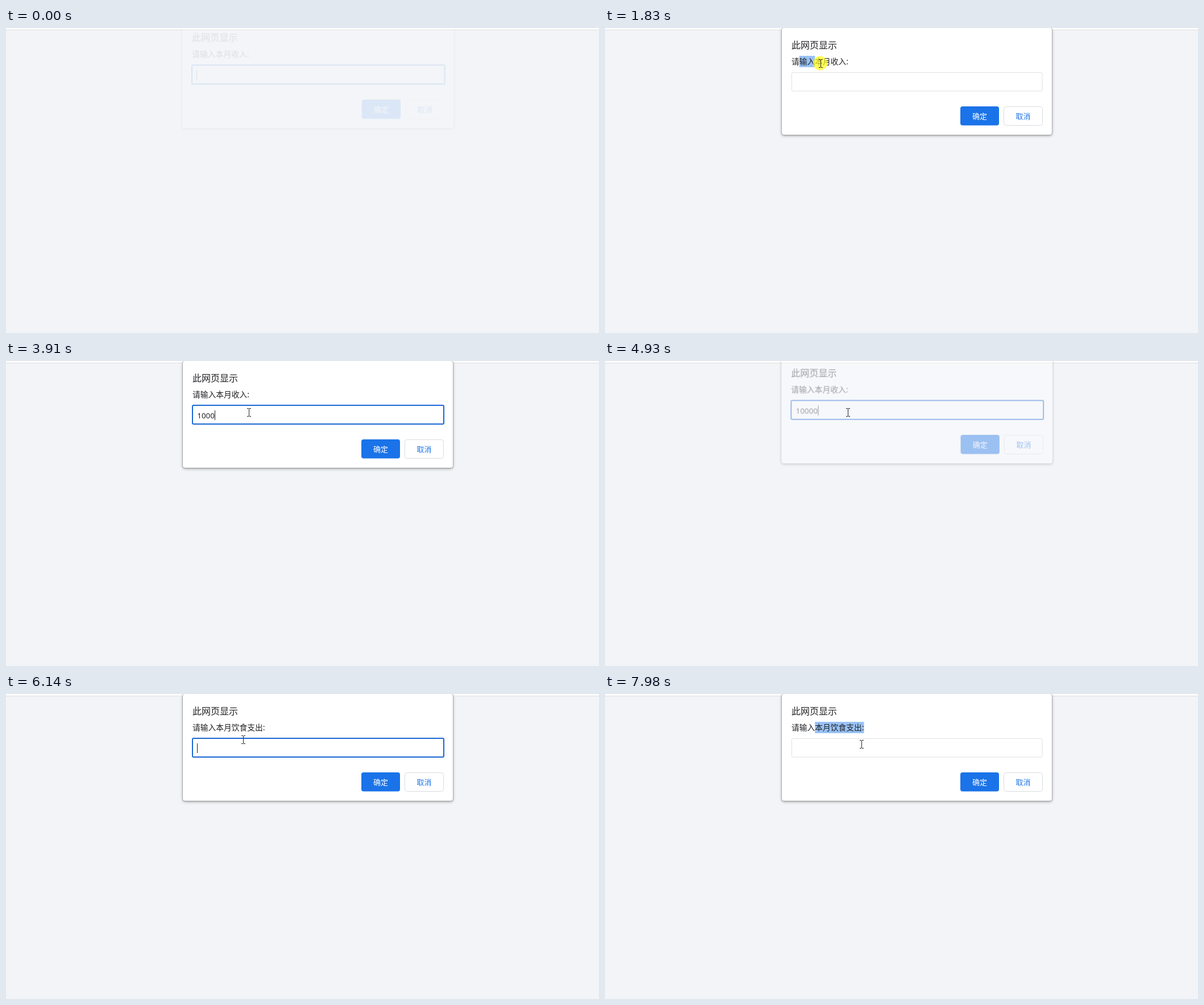
Animation of 1043 by 537 pixels, one loop 8000 ms. Source, as an HTML page with a canvas:

```html
<!DOCTYPE html>
<html lang="zh-CN">
<head>
<meta charset="utf-8">
<title>Prompt dialog</title>
<style>
html, body { margin: 0; width: 100%; height: 100%; overflow: hidden; background: #f2f4f8; }
canvas { display: block; }
</style>
</head>
<body>
<canvas id="stage" width="1043" height="537"></canvas>
<script>
const W = 1043, H = 537, LOOP = 8000;
const stage = document.getElementById('stage').getContext('2d');
const sheet = document.createElement('canvas');
sheet.width = W;
sheet.height = H;
const ctx = sheet.getContext('2d');

const CJK = '"Noto Sans CJK SC", "Noto Sans CJK", "Noto Sans", sans-serif';
const LABEL_FONT = '13.75px ' + CJK;
const DIGIT_FONT = '13.4px "Noto Sans", sans-serif';
const INK = '#202124', BLUE = '#1a73e8';
const LEFT = 328;

// Pointer path: time, x, y
const PATH = [
  [400, 42, 200], [470, 290, 142], [540, 387, 118], [610, 392, 112], [740, 385, 88],
  [880, 370, 62], [1010, 352, 53], [1150, 344, 56], [1360, 344, 56], [1830, 379, 62],
  [2020, 416, 62], [2090, 421, 64], [2290, 421, 64], [2360, 427, 60], [2500, 427, 60],
  [2570, 430, 65], [2710, 429, 82], [2850, 427, 90], [5860, 427, 90], [6130, 417, 80],
  [6400, 380, 62], [6620, 367, 57], [6890, 367, 57], [6960, 374, 57], [7160, 430, 55],
  [7300, 470, 49], [7370, 466, 43], [7630, 466, 43], [7700, 463, 52], [7980, 451, 88]
];
const PRESSES = [[1220, 2360], [2920, 2980], [6690, 7370]];
const SELECTIONS = [[1220, 2920], [6760, LOOP]];
const BLURRED = [[1220, 2920], [6760, LOOP]];
const CARET = [[0, 400], [970, 1220], [2920, 3450], [3570, 4790], [4930, 5460], [5960, 6460]];
const KEYSTROKES = [3570, 3680, 3800, 3910, 4310];
const NEXT_PROMPT = 4995;

const active = (spans, t) => spans.find(([from, to]) => t >= from && t < to);

function pointerAt(t) {
  const i = PATH.findIndex(p => p[0] > t);
  if (i < 0) return PATH[PATH.length - 1].slice(1);
  const [t0, x0, y0] = PATH[Math.max(0, i - 1)];
  const [t1, x1, y1] = PATH[i];
  const steps = Math.max(1, Math.round((t1 - t0) / 70));
  const f = Math.max(0, Math.floor((t - t0) / (t1 - t0) * steps) / steps);
  return [x0 + (x1 - x0) * f, y0 + (y1 - y0) * f];
}

function opacityAt(t) {
  if (t < 70) return 0.1;
  if (t < 140) return 0.6;
  if (t >= 4930 && t < NEXT_PROMPT) return 0.4;
  if (t >= NEXT_PROMPT && t < 5060) return 0.3;
  return 1;
}

function box(c, x, y, w, h, r, fill, stroke, width = 1) {
  c.beginPath();
  c.roundRect(x, y, w, h, r);
  if (fill) { c.fillStyle = fill; c.fill(); }
  if (stroke) { c.strokeStyle = stroke; c.lineWidth = width; c.stroke(); }
}

function text(str, x, y, font, color = INK, align = 'left') {
  ctx.font = font;
  ctx.fillStyle = color;
  ctx.textAlign = align;
  ctx.fillText(str, x, y);
}

function widthOf(str, font) {
  ctx.font = font;
  return ctx.measureText(str).width;
}

function drawSelection(t, label) {
  const span = active(SELECTIONS, t);
  if (!span) return;
  const edge = time => {
    const n = Math.round((pointerAt(time)[0] - LEFT) / 13.75);
    return LEFT + widthOf(label.slice(0, Math.max(0, n)), LABEL_FONT);
  };
  const press = active(PRESSES, t);
  const release = PRESSES.find(p => p[1] > span[0])[1];
  const from = edge(span[0]);
  const to = edge(press ? Math.max(span[0], t - 40) : release - 40);
  ctx.fillStyle = '#99c2f5';
  ctx.fillRect(from, 49, to - from, 20);
}

function drawDialog(t, label) {
  ctx.clearRect(0, 0, W, H);
  ctx.save();
  ctx.shadowColor = 'rgba(0,0,0,.38)';
  ctx.shadowBlur = 5;
  ctx.shadowOffsetY = 1.5;
  box(ctx, 311, 0, 475, 188, 4, '#fff');
  ctx.restore();
  box(ctx, 310.5, -0.5, 476, 189, 4, null, 'rgba(0,0,0,.16)');

  text('此网页显示', LEFT, 36, '16px ' + CJK);
  drawSelection(t, label);
  text(label, LEFT, 64.2, LABEL_FONT);

  if (active(BLURRED, t)) box(ctx, 328.5, 78.5, 440.5, 32.5, 2, '#fff', '#dfe0e2');
  else box(ctx, 328, 78, 442, 33, 2, '#fff', '#1967d2', 2);

  const typed = t < NEXT_PROMPT ? '10000'.slice(0, KEYSTROKES.filter(k => t >= k).length) : '';
  text(typed, 336.3, 100.5, DIGIT_FONT);
  if (active(CARET, t)) {
    ctx.fillStyle = INK;
    ctx.fillRect(Math.round(336.3 + widthOf(typed, DIGIT_FONT)), 87, 1, 17);
  }

  box(ctx, 625, 138, 68, 33.5, 4, BLUE);
  text('确定', 659, 160, '13px ' + CJK, '#fff', 'center');
  box(ctx, 701.5, 138.5, 68, 33, 4, '#fff', '#dadce0');
  text('取消', 735.5, 160, '13px ' + CJK, BLUE, 'center');
}

function drawArrow(x, y) {
  const shape = [[0, 0], [0, 14.5], [3.3, 11.4], [5.6, 16.4], [7.8, 15.4], [5.6, 10.6], [10, 10.2]];
  stage.beginPath();
  shape.forEach(([dx, dy]) => stage.lineTo(x + 0.5 + dx, y + 0.5 + dy));
  stage.closePath();
  stage.fillStyle = '#fff';
  stage.fill();
  stage.strokeStyle = '#111';
  stage.lineWidth = 1;
  stage.stroke();
}

function drawBeam(x, y) {
  stage.fillStyle = '#222';
  stage.fillRect(x, y - 6, 1, 13);
  for (const end of [y - 7, y + 7]) {
    stage.fillRect(x - 3, end, 3, 1);
    stage.fillRect(x + 1, end, 3, 1);
  }
}

function drawPointer(t, label) {
  if (t < PATH[0][0]) return;
  const [x, y] = pointerAt(t).map(Math.round);
  const pressed = active(PRESSES, t);
  if (pressed) {
    stage.fillStyle = 'rgba(255,250,20,.7)';
    stage.beginPath();
    stage.arc(x - 0.5, y, 12.5, 0, Math.PI * 2);
    stage.fill();
  }
  const overLabel = y > 49 && y < 69 && x >= LEFT && x < LEFT + widthOf(label, LABEL_FONT) - 2;
  const overInput = y >= 77 && y < 112 && x >= 327 && x < 771;
  if (pressed || overLabel || overInput) drawBeam(x, y);
  else drawArrow(x, y);
}

function render(t) {
  const label = t < NEXT_PROMPT ? '请输入本月收入:' : '请输入本月饮食支出:';
  stage.fillStyle = '#f2f4f8';
  stage.fillRect(0, 0, W, H);
  stage.fillStyle = '#fff';
  stage.fillRect(0, 0, W, 3);
  stage.fillStyle = '#dcdddd';
  stage.fillRect(0, 3, W, 1);

  drawDialog(t, label);
  const opacity = opacityAt(t);
  const lift = (1 - opacity) / 0.9;
  const sx = 1 + 0.006 * lift, sy = 1 + 0.013 * lift;
  stage.save();
  stage.globalAlpha = opacity;
  stage.setTransform(sx, 0, 0, sy, 500 * (1 - sx), -13.8 * lift);
  stage.drawImage(sheet, 0, 0);
  stage.restore();

  drawPointer(t, label);
}

const start = performance.now();
function tick() {
  render((performance.now() - start) % LOOP);
  requestAnimationFrame(tick);
}
tick();
</script>
</body>
</html>
```
